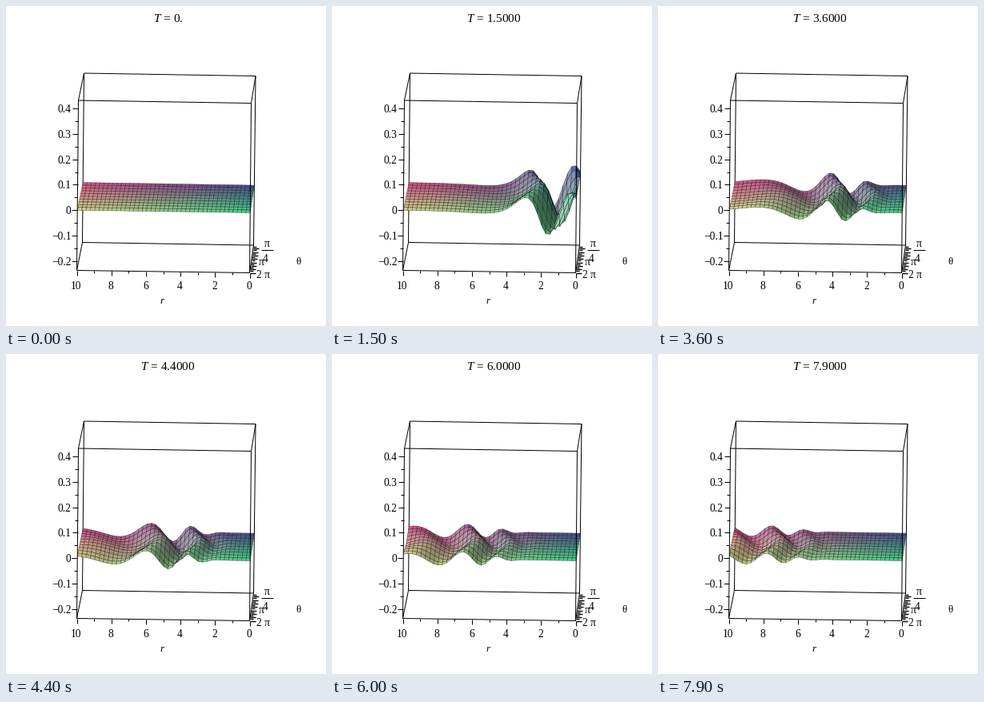
A matplotlib script that plays this animation: 400 by 400 pixels, repeating every 8000 ms.

```python
import numpy as np
import matplotlib.pyplot as plt
from matplotlib.animation import FuncAnimation
from matplotlib.collections import PolyCollection

plt.rcParams.update({
    "font.family": "Liberation Serif",
    "mathtext.fontset": "custom",
    "mathtext.rm": "Liberation Serif",
    "mathtext.it": "Liberation Serif:italic",
})

SIZE, DPI = 400, 100
FRAMES, STEP = 80, 0.1
PX = 72 / DPI
R_MAX, Z_MIN, Z_MAX = 10, -0.237, 0.432
COLS, ROWS = 40, 10
GRAVITY, DEPTH = 9.8, 1.0
AMP, SOURCE, WIDTH = 0.134, 0.35, 0.19

fig = plt.figure(figsize=(SIZE / DPI, SIZE / DPI), dpi=DPI, facecolor="white")
ax = fig.add_axes([0, 0, 1, 1])
ax.set_xlim(0, SIZE)
ax.set_ylim(SIZE, 0)
ax.axis("off")

# Screen corners of the box, indexed [back/front][bottom/top][r=10 / r=0]
BOX = np.array([
    [[(95.5, 295.5), (309.5, 299)], [(97.5, 84), (312, 87.5)]],
    [[(88.5, 330.5), (304.5, 333.5)], [(90.5, 118), (306.5, 121.5)]],
])


def project(r, depth, z):
    """Map r, depth (0 back, 1 front) and height to the screen."""
    r, depth, z = np.broadcast_arrays(r, depth, z)
    u = (1 - r / R_MAX)[..., None]
    s = depth[..., None]
    w = ((z - Z_MIN) / (Z_MAX - Z_MIN))[..., None]

    def face(f):
        low = f[0][0] * (1 - u) + f[0][1] * u
        high = f[1][0] * (1 - u) + f[1][1] * u
        return low * (1 - w) + high * w

    return face(BOX[0]) * (1 - s) + face(BOX[1]) * s


def line(a, b, zorder, width=1.0):
    ax.plot([a[0], b[0]], [a[1], b[1]], color="black", lw=width * PX,
            solid_capstyle="butt", zorder=zorder)


def label(x, y, text, px=13.5, ha="center", **kw):
    ax.text(x, y, text, fontsize=px * PX, ha=ha, va="center_baseline",
            zorder=5, **kw)


def draw_box():
    for depth, zorder in ((0, 1), (1, 3)):
        (bl, br), (tl, tr) = BOX[depth]
        for a, b in ((bl, br), (br, tr), (tr, tl), (tl, bl)):
            line(a, b, zorder)
    for level in (0, 1):
        for side in (0, 1):
            line(BOX[0][level][side], BOX[1][level][side], 1 if side == 0 else 3)


def draw_axes():
    for i in range(-4, 9):
        p = project(R_MAX, 1, i * 0.05)
        major = i % 2 == 0
        line(p, p - (7 if major else 4, 0), 3)
        if major:
            text = "0" if i == 0 else f"{i * 0.05:.1f}".replace("-", "\u2212")
            label(81.5, p[1], text, ha="right")
    for r in range(R_MAX + 1):
        p = project(r, 1, Z_MIN)
        major = r % 2 == 0
        line(p, p + (0, 6 if major else 3), 3)
        if major:
            label(p[0] - 0.5, 348.5, str(r))
    for i in range(1, 17):
        p = project(0, i / 16, Z_MIN)
        line(p, p + (7 if i % 2 == 0 else 4, 0), 3, 1.4)

    label(195, 367, "r", 13, style="italic")
    label(365.5, 318.5, "θ", 13)
    label(326, 296, "π", 14)
    line((319, 304.5), (334, 304.5), 3)
    label(324.5, 315, "4")
    label(319, 319, "π", 14)
    label(321.5, 335, "2 π")


# Water waves on finite depth after a Gaussian pressure impulse
s = np.linspace(0, 3, 280)
k = s ** 2
omega = np.sqrt(GRAVITY * k * np.tanh(k * DEPTH))
dist = np.linspace(0, R_MAX + 0.5, 500)
phi = (np.arange(64) + 0.5) * np.pi / 64
bessel = np.zeros((dist.size, k.size))
for p in phi:
    bessel += np.cos(np.outer(dist, k) * np.sin(p)) / phi.size
spectrum = (AMP * k * omega / np.sqrt(GRAVITY) * np.exp(-WIDTH * k ** 2)
            * 2 * s * (s[1] - s[0]))

radius = np.linspace(R_MAX, 0, COLS + 1)[None, :]
depth = np.linspace(0, 1, ROWS + 1)[:, None]
spread = np.sqrt(np.maximum(
    radius ** 2 + SOURCE ** 2
    - 2 * radius * SOURCE * np.cos(2 * np.pi * depth), 0))


def height(t):
    wave = bessel @ (spectrum * np.sin(omega * t))
    return np.interp(spread, dist, wave)


def cell_mean(a):
    return (a[:-1, :-1] + a[1:, :-1] + a[1:, 1:] + a[:-1, 1:]) / 4


def colors(z):
    full = np.ones_like(z)
    red = cell_mean(full * radius / R_MAX)
    green = cell_mean(full * depth)
    blue = cell_mean(z)
    rgb = np.stack([0.26 + 0.58 * red, 0.29 + 0.54 * green,
                    0.53 + 0.9 * blue], axis=-1)
    # Light comes from the left
    rise = np.diff(z, axis=1) * 316 / (215 / COLS)
    slope = np.tanh((rise[:-1] + rise[1:]) / 2)[..., None]
    lit = rgb + (1 - rgb) * 0.4 * np.maximum(slope, 0)
    lit *= 1 + 0.42 * np.minimum(slope, 0)
    return np.clip(lit, 0, 1).reshape(-1, 3)


def quads(pts):
    q = np.stack([pts[:-1, :-1], pts[1:, :-1], pts[1:, 1:], pts[:-1, 1:]],
                 axis=2)
    return q.reshape(-1, 4, 2)


draw_box()
draw_axes()
surface = PolyCollection([], edgecolors=[(0, 0, 0, 0.56)],
                         linewidths=0.55 * PX, zorder=2)
ax.add_collection(surface)
title = ax.text(202.5, 14, "", fontsize=15.2 * PX, ha="center",
                va="center_baseline", zorder=5)


def caption(t):
    value = "0." if t == 0 else f"{t:.{5 if t < 0.95 else 4}f}"
    return rf"$T\,=\,{value}$"


def update(i):
    t = i * STEP
    z = height(t)
    surface.set_verts(quads(project(radius, depth, z)))
    surface.set_facecolor(colors(z))
    title.set_text(caption(t))
    return surface, title


anim = FuncAnimation(fig, update, frames=FRAMES, interval=100,
                     repeat=True, repeat_delay=0, blit=False)
plt.show()
```
